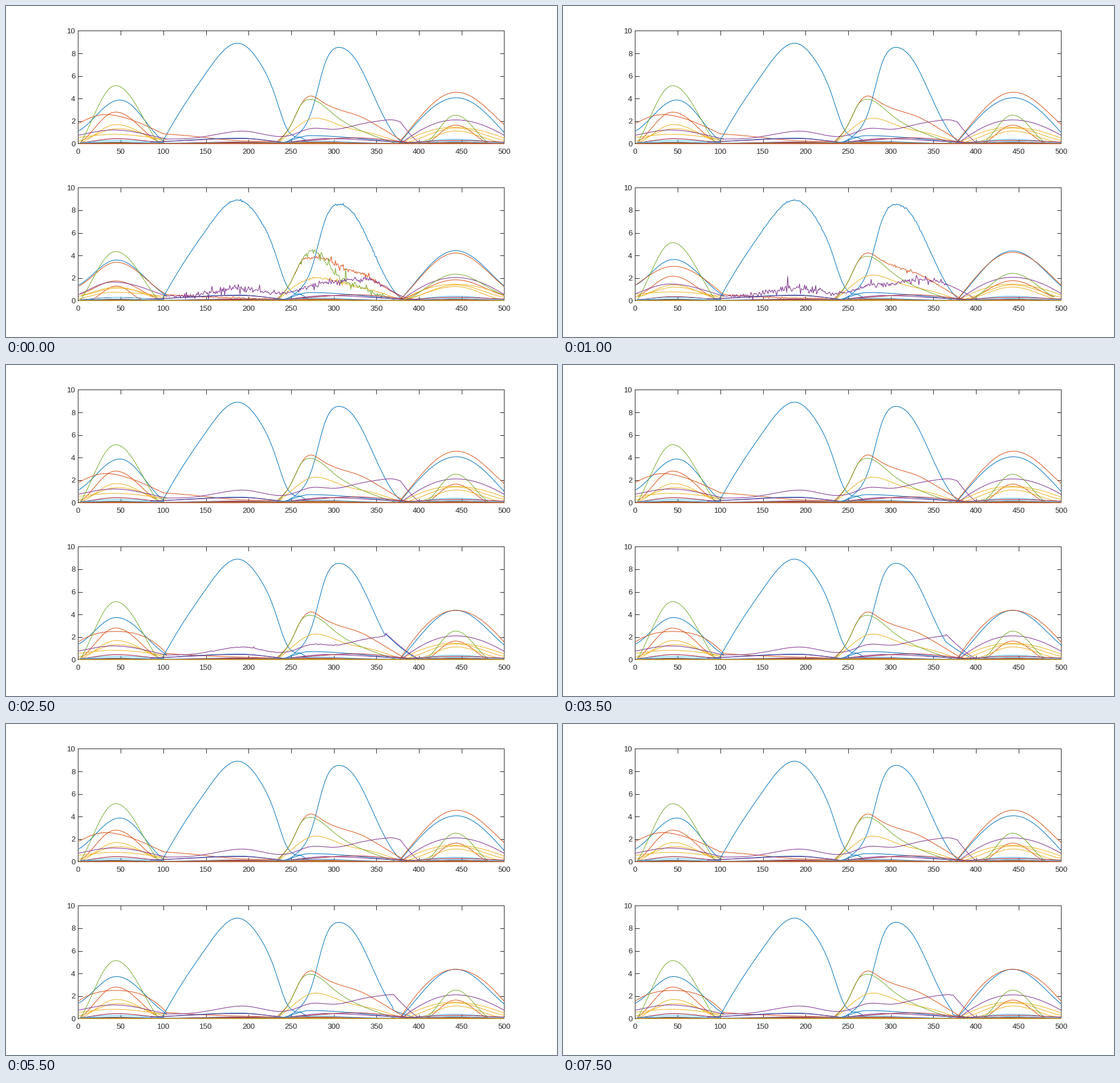
A matplotlib script that plays this animation: 966 by 580 pixels, repeating every 8 s.

```python
import numpy as np
import matplotlib.pyplot as plt
from matplotlib.animation import FuncAnimation

plt.rcParams["font.family"] = "Liberation Sans"

W, H, DPI = 966, 580, 100
PX = 72 / DPI
FRAMES, INTERVAL = 16, 500
SETTLE = 5       # frames until the lower curves have settled
LIMIT = 1000     # the upper plot shows the state after endless time
DARK = "#262626"
COLORS = "#0072BD #D95319 #EDB120 #7E2F8E #77AC30 #4DBEEE #A2142F".split()
BLUE, ORANGE, YELLOW, PURPLE, GREEN, CYAN, RED = COLORS

fig = plt.figure(figsize=(W / DPI, H / DPI), dpi=DPI, facecolor="white")
moving = []


def make_axes(y_top):
    left, right, height = 126.4, 873.4, 198
    ax = fig.add_axes([left / W, 1 - (y_top + height) / H,
                       (right - left) / W, height / H])
    ax.set(xlim=(0, 500), ylim=(0, 10))
    ax.set_xticks(range(0, 501, 50))
    ax.set_yticks(range(0, 11, 2))
    ax.set_axisbelow(True)
    ax.tick_params(direction="in", top=True, right=True, length=7.5 * PX,
                   width=PX, color=DARK, labelcolor=DARK,
                   labelsize=13.33 * PX)
    ax.tick_params(axis="x", pad=8.5 * PX)
    ax.tick_params(axis="y", pad=5 * PX)
    for spine in ax.spines.values():
        spine.set(linewidth=PX, color=DARK, zorder=1)
    return ax


def at(value, frame):
    """A constant, or (early, late[, duration]) changing linearly."""
    if not isinstance(value, tuple):
        return value
    early, late, *duration = value
    t = min(frame / (duration[0] if duration else SETTLE), 1)
    return early + (late - early) * t


def spline(xs, ys, x):
    """Natural cubic spline."""
    n, h = len(xs), np.diff(xs)
    a, b = np.eye(n), np.zeros(n)
    for i in range(1, n - 1):
        a[i, i - 1:i + 2] = h[i - 1], 2 * (h[i - 1] + h[i]), h[i]
        b[i] = 6 * ((ys[i + 1] - ys[i]) / h[i] - (ys[i] - ys[i - 1]) / h[i - 1])
    m = np.linalg.solve(a, b)
    i = np.clip(np.searchsorted(xs, x, side="right") - 1, 0, n - 2)
    p, q = (xs[i + 1] - x) / h[i], (x - xs[i]) / h[i]
    return (p * ys[i] + q * ys[i + 1]
            + ((p**3 - p) * m[i] + (q**3 - q) * m[i + 1]) * h[i]**2 / 6)


def add(axes, color, fn):
    for ax in axes:
        line, = ax.plot(*fn(LIMIT), color=color, lw=1.03 * PX, clip_on=False)
        if ax is low:
            moving.append((line, fn))


def jitter(x, frame, seed, x0, x1, amp, last):
    """Noise inside a window, dying out after frame `last`."""
    rng = np.random.default_rng(1000 * seed + frame)
    window = np.sin(np.pi * np.clip((x - x0) / (x1 - x0), 0, 1)) ** 0.5
    fade = 0.1 ** max(frame - last, 0)
    return amp * fade * window * rng.laplace(scale=0.7, size=x.size)


def curve(axes, color, *points, noise=(), swap=None):
    """Spline through a few points; `swap` lets two lines trade places."""
    xs = np.array([p[0] for p in points], float)
    seed = len(moving)

    def fn(frame):
        ys = np.array([at(p[1], frame) for p in points], float)
        x = np.arange(xs[0], xs[-1] + 1)
        y = spline(xs, ys, x)
        if swap and frame >= SETTLE:
            age = frame - SETTLE
            rest, gain, decay = swap
            cross = 377 - 17 * np.exp(-age / 7)
            u = np.clip((x - cross) / (xs[-1] - cross), 0, 1)
            height = rest + gain * np.exp(-age / decay)
            y = np.where(x > cross, 0.05 + height * (1 - u) ** 1.3, y)
        for i, spec in enumerate(noise):
            y = y + jitter(x, frame, seed + 50 * i, *spec)
        return x, np.maximum(y, 0.04)

    add(axes, color, fn)


def hump(axes, color, lo, mid, hi, peak, start=0.05, end=0.05, k=0.5):
    """Bell blended from cos (k=1) and cos squared (k=0)."""
    def fn(frame):
        a, b = at(lo, frame), at(hi, frame)
        x = np.arange(np.floor(a), np.floor(b) + 1)
        u = np.where(x < mid, (mid - x) / (mid - a), (x - mid) / (b - mid))
        c = np.cos(np.pi / 2 * np.clip(u, 0, 1))
        mix = at(k, frame)
        base = np.where(x < mid, at(start, frame), at(end, frame))
        return x, base + (at(peak, frame) - base) * (mix * c + (1 - mix) * c**2)

    add(axes, color, fn)


def clutter(axes, count=14):
    """Many weak modes just above zero."""
    rng = np.random.default_rng(3)
    x = np.arange(1, 501)
    for k in range(count):
        y = 0.2 + sum(rng.uniform(0.3, 0.8) * np.exp(-((x - c) / w) ** 2)
                      for c, w in ((45, 28), (185, 45), (285, 40), (443, 32)))
        y *= 0.26 * 0.78**k
        add(axes, COLORS[(k + 5) % 7], lambda f, y=y: (x, y))


top, low = make_axes(43.4), make_axes(318.4)
both = (top, low)

# Left group
hump([top], BLUE, 1, 49, 100, 3.87, 1.15, .25)
hump([low], BLUE, 1, 45, 104, (3.6, 3.73), 1.4, .45)
curve([top], ORANGE, (1, 1.83), (25, 2.53), (50, 2.4), (75, 1.75), (100, .88))
hump([low], ORANGE, 1, 45, 104, (3.4, 2.5), (1.3, 1.6), .55, k=(.5, 1.5))
hump(both, ORANGE, 3, 44, 94, (1.75, 2.8), (.6, .15), .2)
hump(both, ORANGE, 15, 45, 75, (1.3, .06, 2))
hump(both, YELLOW, 4, 45, 97, (1.2, 1.7), (.5, .1), .15)
hump(both, YELLOW, 1, 47, 104, (1.1, 1.34), (.4, .25), .2)
hump(both, YELLOW, 1, 42, 104, (.75, .83), (.15, .57, 1), .38, k=.8)
hump(both, PURPLE, 1, 41, 103, (1.65, 1.22), (.55, .77), .44, k=.8)
hump(both, GREEN, 3, 44, 94, (4.35, 5.14, 1), .1, .1, k=.65)
hump(both, RED, 3, 45, 100, (.3, .45), .1, .1)
hump(both, CYAN, 3, 45, 100, .3, .1, .1)

# Middle group
curve(both, BLUE, (98, .05), (116, 2.4), (150, 6.25), (188, 8.9), (213, 7.2),
      (230, 4.5), (246, 1.2), (254, .65), noise=[(140, 245, .035, 3)])
curve(both, BLUE, (254, .6), (275, 3.1), (289, 6.95), (307, 8.53), (327, 7.3),
      (350, 3.75), (381, .1), (400, .05), noise=[(285, 362, .05, 3)],
      swap=(0, 2.3, 5))
hump(both, BLUE, 242, 258, 272, .6, .05, .1)
curve([top], ORANGE, (100, .88), (133, .68), (183, .3), (233, .2))
curve([low], ORANGE, (104, .55), (133, .4), (183, .25), (233, .15),
      noise=[(110, 233, .05, 3)])
curve(both, ORANGE, (233, .15), (250, 1.7), (261, 3.4), (272, (3.75, 4.22, 2)),
      (285, 3.78), (312, 2.88), (333, 2.35), (350, 1.65), (384, .1),
      noise=[(255, 362, .17, 0), (275, 362, .06, 3)])
curve(both, YELLOW, (235, .1), (250, 1.05), (272, (1.95, 2.18, 2)), (310, 1.55),
      (343, .95), (380, .05), noise=[(252, 365, .07, 0)])
curve(both, GREEN, (234, .1), (250, 1.7), (261, 3.4), (271, (4.3, 3.93, 1)),
      (300, 2.6), (337, 1.0), (372, .05), noise=[(252, 365, .26, 0)])
curve(both, PURPLE, (103, .42), (135, .5), (170, .93), (197, 1.11), (234, .65),
      (250, .77), (272, 1.33), (300, (1.7, 1.28)), (327, (1.9, 1.66)),
      (358, (1.35, 2.07)), (377, (.5, 1.95)), (402, .05),
      noise=[(105, 250, .2, 4), (252, 368, .2, 4)], swap=(2.0, .35, 6))
for color, lo, mid, hi, peak in ((BLUE, 242, 272, 385, .72),
                                 (PURPLE, 245, 290, 390, .45),
                                 (RED, 245, 325, 395, .52),
                                 (BLUE, 85, 190, 245, .5),
                                 (PURPLE, 85, 190, 248, .46)):
    hump(both, color, lo, mid, hi, peak, .15, .1)

# Right group
hump([top], BLUE, 377, 444, 500, 4.07, .05, 1.0, k=.95)
hump([low], BLUE, 378, 443, 500, (4.43, 4.37), .1, 1.3, k=.75)
hump([top], ORANGE, 376, 444, 500, 4.56, .05, 1.7, k=.85)
hump([low], ORANGE, 378, 443, 500, (4.22, 4.37), .1, (1.25, 1.55), k=(.75, 1.1))
hump(both, ORANGE, (380, 411), 443, (500, 479), (1.85, 1.65), .1, (.45, .1), k=.6)
hump(both, YELLOW, 380, 441, 500, 1.46, .1, .5, k=1.1)
hump(both, YELLOW, 385, 443, 500, 1.39, .1, .3)
hump(both, YELLOW, (382, 400), 443, 495, (1.25, 1.13), .1, .12)
hump(both, PURPLE, 380, 443, 500, (2.05, 2.11), .1, (.55, .75), k=1.1)
hump(both, GREEN, (385, 409), 443, (500, 482), (2.35, 2.53), .1, (.5, .05))
hump(both, CYAN, 388, 441, 500, .4, .1, .1)
hump(both, RED, 385, 443, 500, .3, .1, .15)

clutter(both)
for ax, color in ((top, ORANGE), (low, YELLOW)):
    ax.plot([1, 500], [0, 0], color=color, lw=PX, clip_on=False)


def update(frame):
    for line, fn in moving:
        line.set_data(*fn(frame))
    return [line for line, _ in moving]


anim = FuncAnimation(fig, update, frames=FRAMES, interval=INTERVAL,
                     init_func=lambda: update(0), repeat=True, repeat_delay=0)
plt.show()
```
